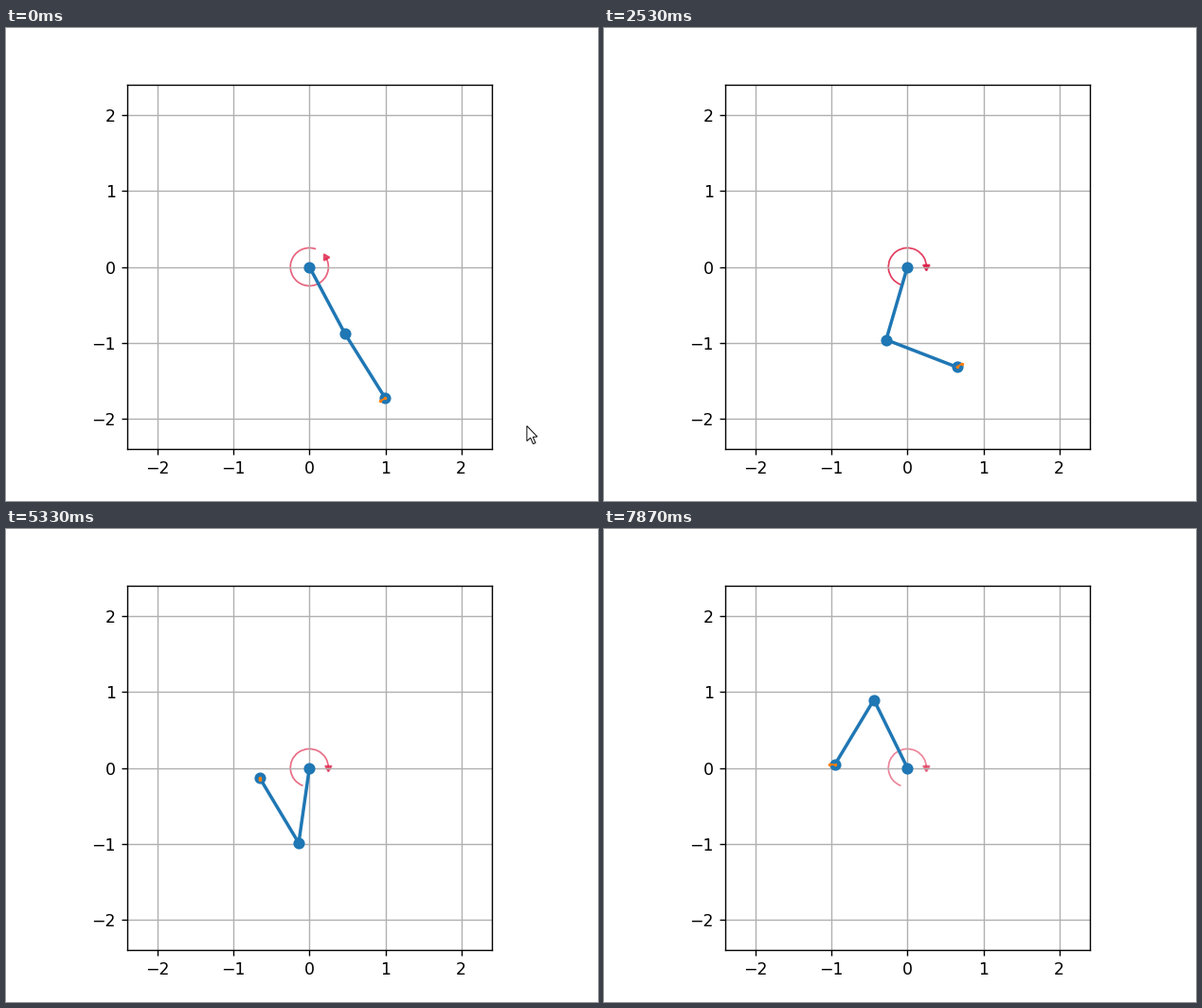
These frames come from a looping animation (625x500 px, 8 s). A matplotlib script:

```python
import numpy as np
import matplotlib.pyplot as plt
from matplotlib.animation import FuncAnimation
from matplotlib.patches import Arc, Polygon, RegularPolygon

W, H, DPI = 625, 500, 125
STEP_MS, FRAMES = 40, 200
RATE = 15      # poses per second
LEAD = 0.03    # keeps pose changes ahead of the display step
REACH = 2.4
GAIN, LIMIT = 0.021, 0.82  # shoulder torque follows the upper arm's speed

# main poses: time (s), upper and lower angle (deg from straight down)
POSES = np.array([
    (0.00, 28, 32),
    (0.20, 32, 39),
    (0.80, 16.5, 72.7),
    (1.87, -1.5, 82),
    (2.53, -16.1, 69),
    (2.90, -34, 41),
    (3.20, -38, 7),
    (3.67, -26.9, -36.8),
    (4.13, -12.5, -77),
    (4.60, -6, -112.5),
    (5.33, -8, -149),
    (6.00, -43.4, -158.4),
    (6.80, -95, -117),
    (7.27, -129, -67),
    (7.87, -153.9, -30.9),
])
TIMES, ANGLES = POSES[:, 0], POSES[:, 1:]
SPEEDS = np.gradient(ANGLES, TIMES, axis=0, edge_order=2)


def angles_at(t):
    """Cubic Hermite interpolation between the main poses."""
    i = int(np.clip(np.searchsorted(TIMES, t) - 1, 0, len(TIMES) - 2))
    h = TIMES[i + 1] - TIMES[i]
    u = (t - TIMES[i]) / h
    return ((1 + 2 * u) * (1 - u) ** 2 * ANGLES[i]
            + u * (1 - u) ** 2 * h * SPEEDS[i]
            + u * u * (3 - 2 * u) * ANGLES[i + 1]
            + u * u * (u - 1) * h * SPEEDS[i + 1])


def torque_at(t, d=0.01):
    speed = (angles_at(t + d)[0] - angles_at(t - d)[0]) / (2 * d)
    return float(np.clip(GAIN * speed, -LIMIT, LIMIT))


def joints(t):
    a, b = np.radians(angles_at(t))
    x = np.cumsum([0, np.sin(a), np.sin(b)])
    y = np.cumsum([0, -np.cos(a), -np.cos(b)])
    return x, y


fig = plt.figure(figsize=(W / DPI, H / DPI), dpi=DPI)
ax = fig.add_subplot(autoscale_on=False, xlim=(-REACH, REACH), ylim=(-REACH, REACH))
ax.set_aspect("equal")
ax.set_xticks(range(-2, 3))
ax.set_yticks(range(-2, 3))
ax.grid()


def torque_arrow(start, end, tip, turn, radius=0.25):
    arc = Arc((0, 0), 2 * radius, 2 * radius, theta1=start, theta2=end,
              color="crimson", lw=1)
    a = np.radians(tip)
    head = RegularPolygon((radius * np.cos(a), radius * np.sin(a)), 3, radius=0.05,
                          orientation=np.radians(turn), color="crimson", lw=1)
    return [ax.add_patch(arc), ax.add_patch(head)]


ccw = torque_arrow(70, 390, 30, 30)
cw = torque_arrow(0, 250, 0, 180)
rod, = ax.plot([], [], "o-", lw=2)
trace, = ax.plot([], [], ".-", lw=1, ms=2)

POINTER = np.array([(0, 0), (0, 16), (3.8, 12.6), (6.6, 19), (9.2, 18),
                    (6.4, 11.8), (11, 11.4)])
pointer = fig.add_artist(Polygon(POINTER, fc="white", ec="black", lw=0.55,
                                 transform=fig.transFigure, zorder=10))


def place_pointer(t):
    p = min(t / 0.45, 1)
    p = p * p * (3 - 2 * p)
    pts = POINTER + (549.9 + 44 * p, 420.6 + 80 * p)
    pointer.set_xy(np.column_stack([pts[:, 0] / W, 1 - pts[:, 1] / H]))
    pointer.set_visible(p < 1)


def update(n):
    t = int((n * STEP_MS / 1000 + LEAD) * RATE) / RATE
    x, y = joints(t)
    px, py = joints(t - 1 / RATE)
    rod.set_data(x, y)
    trace.set_data([px[2], x[2]], [py[2], y[2]])

    torque = torque_at(t)
    for parts, on in ((ccw, torque > 0), (cw, torque <= 0)):
        for part in parts:
            part.set_visible(on)
            part.set_alpha(abs(torque))
    place_pointer(t)
    return [rod, trace, pointer, *ccw, *cw]


anim = FuncAnimation(fig, update, frames=FRAMES, interval=STEP_MS,
                     repeat=True, repeat_delay=0, blit=False)
plt.show()
```
